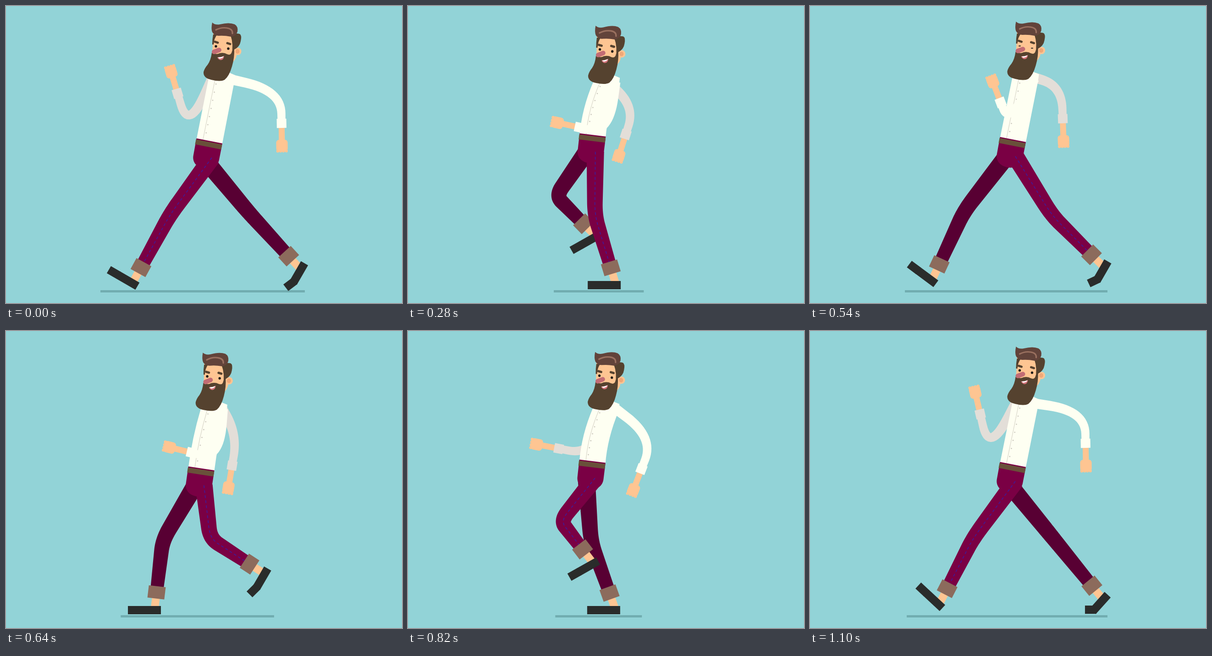
These frames come from a looping animation (864x648 px, 1120 ms). An HTML page with a canvas:

```html
<!DOCTYPE html>
<html lang="en">
<head>
<meta charset="utf-8">
<title>Walk cycle</title>
<style>
  html, body { margin: 0; width: 100%; height: 100%; overflow: hidden; background: #92d3d7; }
  canvas { display: block; }
</style>
</head>
<body>
<canvas id="stage" width="864" height="648"></canvas>
<script>
const ctx = document.getElementById('stage').getContext('2d');
const LOOP = 1120, STEP = 20, RAD = Math.PI / 180;
const C = {
  sky: '#92d3d7', shadow: '#71adb0', shirt: '#fefff2', sleeve: '#e3ded8', seam: '#d9d6ca',
  pants: '#7a0044', farPants: '#580033', stitch: '#3f1a9a', belt: '#69503a', cuff: '#8c6b5c',
  shoe: '#2a2c2b', skin: '#fec592', ear: '#f0a878', beard: '#55422f', hair: '#62433a',
  shine: '#99705f', nose: '#c26c74', eye: '#1d1a18', lip: '#d4737a'
};

// Periodic cubic through rows of [time, ...values]; flat stretches stay flat.
function track(rows) {
  const n = rows.length;
  const key = i => rows[(i + n) % n];
  const time = i => key(i)[0] + LOOP * Math.floor(i / n);
  const slope = (i, c) => (key(i + 1)[c] - key(i)[c]) / (time(i + 1) - time(i));
  const tangent = (i, c) => {
    const a = slope(i - 1, c), b = slope(i, c);
    if (a * b === 0) return 0;
    const before = time(i) - time(i - 1), after = time(i + 1) - time(i);
    return (a * after + b * before) / (before + after);
  };
  return t => {
    let i = n - 1;
    while (rows[i][0] > t) i--;
    const h = time(i + 1) - time(i), u = (t - time(i)) / h, v = 1 - u;
    return key(i).slice(1).map((p, k) => {
      const c = k + 1;
      return p * v * v * (1 + 2 * u) + key(i + 1)[c] * u * u * (3 - 2 * u)
        + h * u * v * (v * tangent(i, c) - u * tangent(i + 1, c));
    });
  };
}

// head x, y, turn; waist x, y, turn
const body = track([
  [0, 450, 36, 0, 442, 302, 11],
  [160, 411, 55, -3, 408, 308.5, 7],
  [380, 420, 31, 0, 408.5, 277, 7],
  [540, 449.5, 34, 0, 441, 299, 11],
  [720, 411, 55, -3, 408, 308.5, 7],
  [920, 416, 33.5, 0, 404.5, 277, 7],
  [1100, 449.5, 34, 0, 441, 299, 11]
]);
const ground = track([
  [0, 206, 652], [160, 298, 524], [380, 301, 547], [540, 207, 649],
  [720, 297, 524], [920, 317, 532], [1100, 211, 649]
]);
// knee x, y; ankle x, y; shoe turn, toe bend
const nearLeg = track([
  [0, 358, 455, 280, 597, 30, 0],
  [70, 360, 457, 318, 600, 0, 0],
  [160, 364, 458, 376, 600, 0, 0],
  [380, 458, 455, 518, 600, 0, 0],
  [460, 496, 456, 578, 586, -25, 25],
  [540, 528, 457, 635.5, 564, -60, 35],
  [720, 363, 444, 461, 501, -45, 0],
  [920, 331, 395, 353, 519, -8.5, 0],
  [1100, 356, 452, 285.5, 589, 43, 0]
]);
const farLeg = track([
  [0, 529, 450, 637, 568, -60, 23],
  [160, 369, 450, 476, 507, -48, 0],
  [380, 316, 392, 356, 513, -8, 0],
  [540, 336, 448, 269.5, 591, 36.5, 0],
  [640, 342, 456, 325, 600, 0, 0],
  [720, 352, 460, 376, 600, 0, 0],
  [920, 457, 455, 523, 600, 0, 0],
  [1010, 495, 452, 578, 590, -22, 22],
  [1100, 528, 449, 634, 579, -48, 48]
]);
// elbow x, y; forearm turn, length
const nearArm = track([
  [0, 600, 185, 89, 71],
  [160, 500, 285, 119, 70],
  [380, 410, 258, 246, 61],
  [540, 434, 257, 249, 50],
  [720, 495, 287, 145, 74],
  [920, 572, 174, 92, 70],
  [1100, 600, 175, 89, 70]
]);
const farArm = track([
  [0, 398, 271, 253.5, 84],
  [160, 460, 271, 161, 67],
  [380, 519, 167, 88, 69],
  [540, 549, 175, 88, 71],
  [720, 457, 266, 125, 67],
  [920, 367, 263, 252, 86],
  [1100, 391, 266, 257, 87]
]);

const mix = (a, b, u) => [a[0] + (b[0] - a[0]) * u, a[1] + (b[1] - a[1]) * u];
const polar = (p, deg, d) => [p[0] + d * Math.cos(deg * RAD), p[1] + d * Math.sin(deg * RAD)];
const place = (x, y, deg) => (px, py) => polar(polar([x, y], deg, px), deg + 90, py);

function within(x, y, deg, draw) {
  ctx.save();
  ctx.translate(x, y);
  ctx.rotate(deg * RAD);
  draw();
  ctx.restore();
}
function rect(color, x, y, w, h) {
  ctx.fillStyle = color;
  ctx.fillRect(x, y, w, h);
}
function shape(color, d) {
  ctx.fillStyle = color;
  ctx.fill(new Path2D(d));
}
function stroke(color, width, d) {
  ctx.strokeStyle = color;
  ctx.lineWidth = width;
  ctx.lineCap = 'round';
  ctx.stroke(new Path2D(d));
}
function oval(color, x, y, rx, ry = rx) {
  ctx.fillStyle = color;
  ctx.beginPath();
  ctx.ellipse(x, y, rx, ry, 0, 0, 7);
  ctx.fill();
}

// Tapered limb from a to b around joint k; returns its centre line.
function tube(color, a, k, b, round, w0, w1) {
  const from = mix(k, a, round), to = mix(k, b, round), line = [[...a, 0]];
  for (let i = 0; i <= 16; i++) {
    const u = i / 16;
    line.push([...mix(mix(from, k, u), mix(k, to, u), u), 0.5 + round * (u - 0.5)]);
  }
  line.push([...b, 1]);
  const side = s => line.map(([x, y, u], i) => {
    const p = line[Math.max(i - 1, 0)], q = line[Math.min(i + 1, line.length - 1)];
    const dx = q[0] - p[0], dy = q[1] - p[1];
    const w = s * (w0 + (w1 - w0) * u) / 2 / (Math.hypot(dx, dy) || 1);
    return [x - dy * w, y + dx * w];
  });
  ctx.fillStyle = color;
  ctx.beginPath();
  [...side(1), ...side(-1).reverse()].forEach(p => ctx.lineTo(...p));
  ctx.fill();
  return line;
}

function leg(color, hip, [kx, ky, x, y, turn, bend], stitched) {
  y = Math.min(y, 600);
  const deg = Math.atan2(y - ky, x - kx) / RAD;
  const hem = polar([x, y], deg, -30);
  within(x, y, deg, () => rect(C.skin, -30, -8.5, 34, 17));
  const line = tube(color, hip, [kx, ky], hem, 0.2, 38, 28);
  if (stitched) {
    ctx.strokeStyle = C.stitch;
    ctx.lineWidth = 1.7;
    ctx.lineCap = 'butt';
    ctx.setLineDash([6, 5]);
    ctx.beginPath();
    line.forEach(p => ctx.lineTo(p[0], p[1]));
    ctx.stroke();
    ctx.setLineDash([]);
  }
  within(...hem, deg, () => rect(C.cuff, -13.5, -18.5, 27, 37));
  within(x, y, turn, () => {
    rect(C.shoe, -35.5, 0, 48.5, 18);
    within(-35, 18, Math.max(bend, 0), () => rect(C.shoe, -24, -18, 24.5, 18));
  });
}

function arm(color, shoulder, [ex, ey, turn, len]) {
  const wrist = polar([ex, ey], turn, len);
  within(...wrist, turn, () => {
    rect(C.skin, 0, -6.5, 42, 13);
    ctx.beginPath();
    ctx.roundRect(36, -12.5, 25, 25, 6);
    ctx.fill();
    for (let i = -1.5; i < 2; i++) oval(C.skin, 60.5, i * 6.2, 3.2);
  });
  tube(color, shoulder, [ex, ey], wrist, 0.7, 22, 17);
  within(...wrist, turn, () => rect(color, -10, -10.5, 20, 21));
}

function shirt(head, waist, bow) {
  const curve = (a, b) => {
    const m = mix(a, b, 0.5);
    return [m[0] - bow, m[1]];
  };
  const neck = head(-8, 122), left = waist(-28, -5), right = waist(29, -5);
  const top = head(50, 115), side = head(48, 130);
  ctx.fillStyle = C.shirt;
  ctx.beginPath();
  ctx.moveTo(...neck);
  ctx.quadraticCurveTo(...curve(neck, left), ...left);
  ctx.lineTo(...right);
  ctx.quadraticCurveTo(...curve(side, right), ...side);
  ctx.lineTo(...top);
  ctx.lineTo(...head(34, 108));
  ctx.fill();

  const a = head(6, 125), b = waist(-14, -6), k = curve(a, b);
  ctx.strokeStyle = C.seam;
  ctx.lineWidth = 1.2;
  ctx.beginPath();
  ctx.moveTo(...a);
  ctx.quadraticCurveTo(...k, ...b);
  ctx.stroke();
  for (let i = 0; i < 7; i++) {
    const u = 0.07 + i * 0.134, p = mix(mix(a, k, u), mix(k, b, u), u);
    oval('#c9c5ba', p[0] + 4, p[1], 1.3);
  }
}

function face(x, y, turn, open) {
  within(x, y, turn, () => {
    ctx.translate(-450, -36);
    shape(C.skin, 'M452 60H498L504 100Q504 114 495 122L450 106Z');
    oval(C.skin, 506, 99, 7.5, 8);
    oval(C.ear, 505, 99, 4.5, 5);
    shape(C.beard, 'M452 62L461 62Q454 70 453 84L450 84Q450 72 452 62Z');
    shape(C.beard, 'M490 64Q500 58 510 61Q515 64 512 77Q510 89 498 95L496 112L492 108Q497 84 490 64Z');
    shape(C.beard, 'M449 102Q460 107 466 103Q476 101 482 105Q491 109 493 99L498 92'
      + 'Q499 112 493 132Q487 153 477 161Q468 166 448 161Q430 157 431 144Q433 136 440 128Q447 118 449 102Z');
    shape(C.lip, 'M461 112Q469 112 476 109Q475 118 468 118Q463 117 461 112Z');
    shape('#fff', 'M462 112Q469 112 475 109.5Q473 114 466 115Z');
    stroke(C.nose, 10, 'M454 100L465 96');
    stroke(C.beard, 5, 'M456 78L462 80M483 81L489 83');
    oval(C.eye, 458, 88 + 2 * (1 - open), 2.7, 2.8 * open);
    oval(C.eye, 485, 93 + 1.5 * (1 - open), 2.7, 2.8 * open);
    shape(C.hair, 'M450 36Q456 42 467 40Q487 35 499 40Q507 45 505 56Q502 66 491 67'
      + 'Q476 64 464 65Q455 65 450 57Q447 49 450 36Z');
    stroke(C.shine, 3.2, 'M458 52Q470 46 482 48Q495 50 494 60');
  });
}

function draw(t) {
  const [hx, hy, headTurn, wx, wy, waistTurn] = body(t);
  const head = place(hx, hy, headTurn), waist = place(wx, wy, waistTurn);
  const [g0, g1] = ground(t);
  const sway = 20 - 20 * Math.cos(2 * Math.PI * t / LOOP);

  rect(C.sky, 0, 0, 864, 648);
  rect(C.shadow, g0, 620, g1 - g0, 5);
  arm(C.sleeve, head(sway, 122), farArm(t));
  leg(C.farPants, [wx - 12, wy + 29], farLeg(t));
  shirt(head, waist, 2.5 * (11 - waistTurn));
  within(wx, wy, waistTurn, () =>
    shape(C.pants, 'M-28.5 -8H29V28C29 46 14 54 0 54C-17 54 -28 44 -28 30Z'));
  leg(C.pants, [wx + 7, wy + 29], nearLeg(t), true);
  within(wx, wy, waistTurn, () => rect(C.belt, -29, -5.5, 58, 11));
  arm(C.shirt, head(40, 124), nearArm(t));
  face(hx, hy, headTurn, Math.min(1, 0.35 + Math.abs(t - 540) / 80));
}

function tick(now) {
  draw(Math.floor(now / STEP) * STEP % LOOP);
  requestAnimationFrame(tick);
}
requestAnimationFrame(tick);
</script>
</body>
</html>
```
